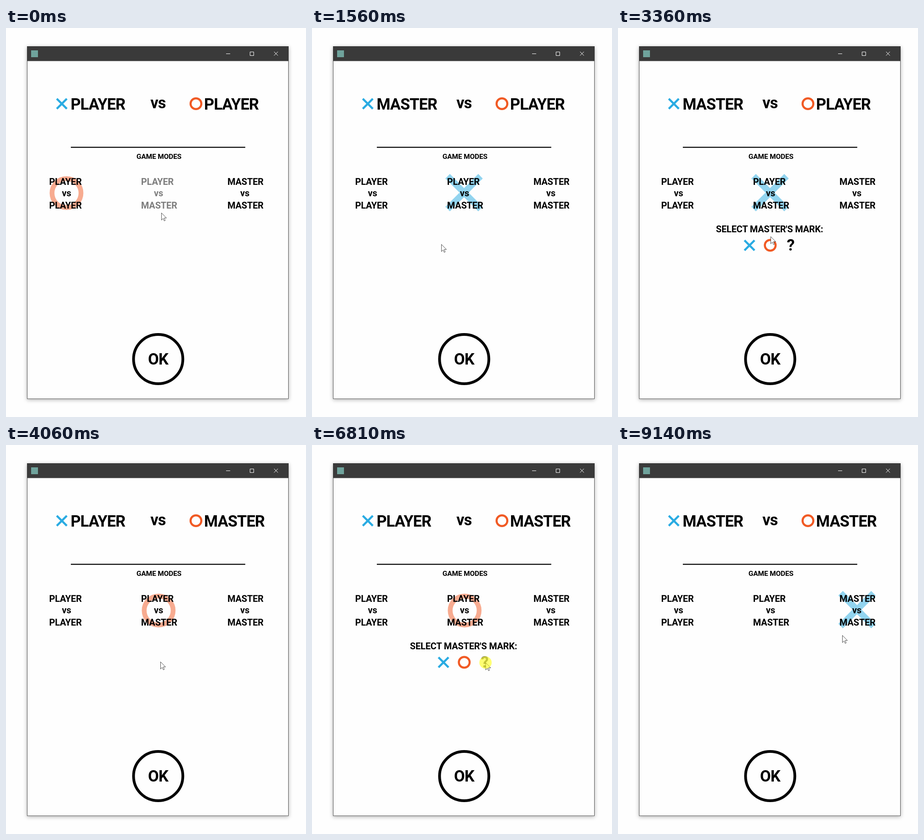
An HTML page that plays this animation: 657x853 px, repeating every 9220 ms.

```html
<!DOCTYPE html>
<html lang="en">
<head>
<meta charset="utf-8">
<title>Game modes</title>
<style>
  html, body { margin: 0; width: 100%; height: 100%; overflow: hidden; background: #fefefe; }
  svg { display: block; width: 657px; height: 853px; }
  text { font: 700 20px Roboto, "Open Sans", sans-serif; letter-spacing: -.15px; white-space: pre; }
  .big { font-size: 34.5px; letter-spacing: -.9px; }
  .small { font-size: 15.5px; letter-spacing: -.15px; }
  .mid { text-anchor: middle; }
  .window { fill: #fefefe; stroke: #555; filter: drop-shadow(0 2px 4px rgba(0, 0, 0, .3)); }
  .x { stroke: #29abe2; fill: none; }
  .o { stroke: #f15a24; fill: none; }
</style>
</head>
<body>
<svg id="stage" viewBox="0 0 657 853">
  <rect class="window" x="46.5" y="40.5" width="572" height="772.5"/>
  <rect x="46" y="40" width="573" height="32.5" fill="#3a3a3a"/>
  <rect x="55" y="49" width="15" height="15" fill="#6fa39c"/>
  <path d="M482 56.5h9M534.5 52.5h8v8h-8zM587 52l8.5 8.5M595.5 52l-8.5 8.5" fill="none" stroke="#fff"/>
  <path d="M142 261.7H524" stroke="#000" stroke-width="2.2"/>
  <circle cx="333.3" cy="726" r="54" fill="none" stroke="#000" stroke-width="6"/>
</svg>
<script>
const LOOP = 9220;
const stage = document.getElementById('stage');

function add(tag, attrs, parent = stage, content = '') {
  const el = document.createElementNS('http://www.w3.org/2000/svg', tag);
  for (const k in attrs) el.setAttribute(k, attrs[k]);
  el.textContent = content;
  parent.append(el);
  return el;
}
const label = (str, x, y, cls = '', parent = stage) => add('text', { x, y, class: cls }, parent, str);
const show = (el, on) => { el.style.display = on ? '' : 'none'; };
const fade = (el, on) => { el.style.opacity = on ? .5 : 1; };

function cross(x, y, reach, width, parent) {
  const d = `M${x - reach} ${y - reach}l${2 * reach} ${2 * reach}m0 ${-2 * reach}l${-2 * reach} ${2 * reach}`;
  return add('path', { d, class: 'x', 'stroke-width': width }, parent);
}
const ring = (cx, cy, r, width, parent) =>
  add('circle', { cx, cy, r, class: 'o', 'stroke-width': width }, parent);

// Large pale marks behind the modes
const backs = add('g', { opacity: .5 });
const backMarks = {
  ring0: ring(132.5, 362, 31.7, 10.5, backs),
  cross1: cross(333, 361, 36, 14, backs),
  ring1: ring(334.3, 363, 31.7, 10.5, backs),
  any1: label('?', 334, 423, 'mid', backs),
  cross2: cross(523.5, 361, 36, 14, backs)
};
backMarks.any1.style.fontSize = '168px';

// Header
const headCross = cross(122.2, 166.2, 11, 4.5);
const headRing = ring(416, 166, 11.8, 4.5);
const headAny = [122, 416].map(x => label('?', x, 179, 'big mid'));
const left = label('', 141.5, 179, 'big');
const right = label('', 433.8, 179, 'big');
label('vs', 333, 176, 'big mid');
label('GAME MODES', 335, 287, 'small mid');
label('OK', 333, 738, 'big mid');

// Mode buttons
const modes = [
  [94.4, 132.5, 'PLAYER', 'PLAYER'],
  [295.8, 334, 'PLAYER', 'MASTER'],
  [485, 523, 'MASTER', 'MASTER']
].map(([x, mid, a, b]) => {
  const g = add('g', {});
  label(a, x, 344, '', g);
  label('vs', mid, 369, 'mid', g);
  label(b, x, 396, '', g);
  return { g, x };
});

// Mark chooser
const panel = add('g', {});
label("SELECT MASTER'S MARK:", 214.5, 448, '', panel);
const choices = [
  [288, cross(288, 476.7, 11, 4.5, panel)],
  [333.4, ring(333.4, 476.5, 11.8, 4.5, panel)],
  [378, label('?', 378, 488, 'big mid', panel)]
];

const cursor = add('path', {
  d: 'M.5.5V16.2L4.1 12.7 6.5 18 8.8 17 6.5 11.7H11.4Z',
  fill: '#fff', stroke: '#222', 'stroke-width': .8
});
const spot = add('circle', { r: 13.5, fill: '#ff0', 'fill-opacity': .55 });

// first step, last step, step count, end x, end y
const moves = [
  [80, 230, 3, 334, 384],
  [780, 1320, 8, 283, 474],
  [2120, 2580, 7, 318, 384],
  [3050, 3510, 7, 338, 475],
  [4620, 5170, 8, 341, 375],
  [6030, 6490, 7, 380, 477],
  [7670, 8130, 7, 505, 380],
  [8980, 9140, 3, 491, 417]
];
const clicks = [[390, 460], [1490, 1560], [2660, 2740], [3890, 4060], [5490, 5710], [6810, 6960], [8200, 8430]];
const panelTimes = [[460, 1560], [2740, 4060], [5710, 6960]];
const scenes = [
  [0, 'PLAYER', 'PLAYER', 'ring0'],
  [1560, 'MASTER', 'PLAYER', 'cross1'],
  [4060, 'PLAYER', 'MASTER', 'ring1'],
  [6960, 'PLAYER', 'MASTER', 'any1'],
  [8430, 'MASTER', 'MASTER', 'cross2']
];

const during = (spans, t) => spans.some(([a, b]) => t >= a && t < b);

function pointer(t) {
  let x = 340, y = 405;
  for (const [start, end, n, tx, ty] of moves) {
    if (t < start) break;
    const gap = (end - start) / (n - 1);
    const p = Math.min(n, Math.floor((t - start) / gap + 1.001)) / n;
    const e = p * p * (3 - 2 * p);
    x += (tx - x) * e;
    y += (ty - y) * e;
  }
  return [x, y];
}

function render(t) {
  const [x, y] = pointer(t);
  cursor.setAttribute('transform', `translate(${x} ${y})`);
  spot.setAttribute('cx', x);
  spot.setAttribute('cy', y);
  show(spot, during(clicks, t));

  const [, a, b, mark] = scenes.filter(s => t >= s[0]).pop();
  left.textContent = a;
  right.textContent = b;
  for (const k in backMarks) show(backMarks[k], k === mark);
  const any = mark === 'any1';
  show(headCross, !any);
  show(headRing, !any);
  headAny.forEach(el => show(el, any));

  for (const m of modes) fade(m.g, x > m.x && x < m.x + 78 && y > 325 && y < 411);
  show(panel, during(panelTimes, t));
  for (const [cx, el] of choices) fade(el, Math.hypot(x - cx, y - 476.5) < 14);
}

const origin = performance.now();
function tick() {
  render((performance.now() - origin) % LOOP);
  requestAnimationFrame(tick);
}
render(0);
requestAnimationFrame(tick);
</script>
</body>
</html>
```
